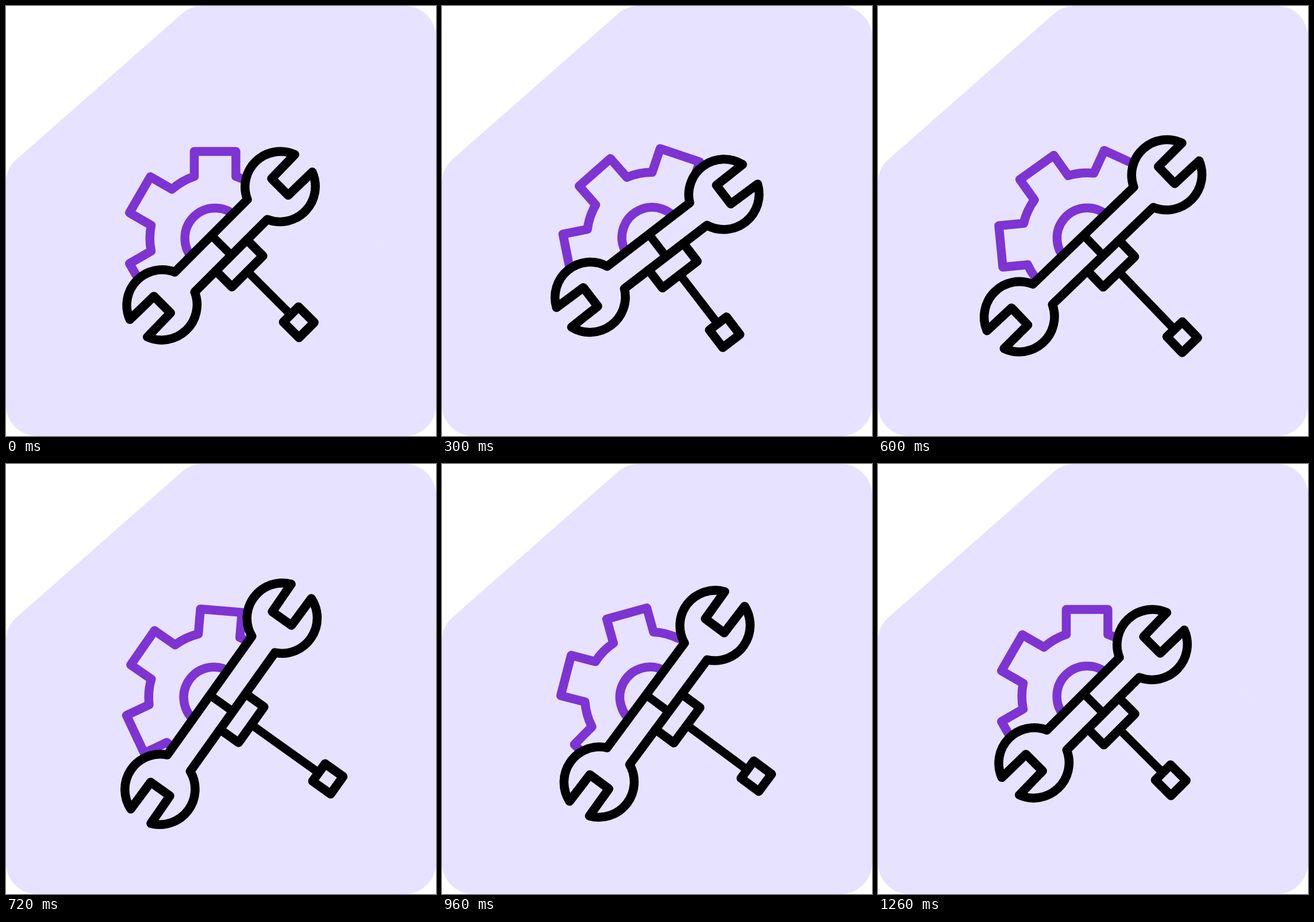
Animation of 748 by 748 pixels, one loop 1290 ms. Source, as an HTML page:

```html
<!DOCTYPE html>
<html lang="en">
<head>
<meta charset="utf-8">
<title>Tools</title>
<style>
  html, body { margin: 0; width: 100%; height: 100%; overflow: hidden; background: #fff; }
  svg { display: block; width: 100vw; height: 100vh; }
  .line { fill: none; stroke: #000; stroke-width: 15.5; stroke-linejoin: round; stroke-linecap: round; }
  .gear { stroke: #7d34d2; }
  .panel { fill: #e7e2ff; }
</style>
</head>
<body>
<svg viewBox="0 0 748 748">
  <path class="panel" d="M341 0H694A54 54 0 0 1 748 54V694A54 54 0 0 1 694 748H54A54 54 0 0 1 0 694V307A54 54 0 0 1 18 267L306 13.4A54 54 0 0 1 341 0Z"/>
  <g id="tools">
    <g id="gear" class="line gear">
      <path id="teeth"/>
      <circle r="52.5"/>
    </g>
    <!-- hides the gear behind and below the wrench -->
    <g class="panel">
      <rect x="-200" y="0" width="400" height="200"/>
      <circle id="coverA" r="61"/>
      <circle id="coverB" r="61"/>
    </g>
    <path id="wrench" class="line" style="fill:#e7e2ff"/>
    <path class="line" d="M-37.3 24.5V64H39V24.5"/>
    <path class="line" style="stroke-width:14.5" d="M1 -24V24"/>
    <path id="shaft" class="line" style="stroke-width:14.5"/>
    <rect id="tip" class="line" x="-17.2" width="37.4" height="38.5"/>
  </g>
</svg>
<script>
const LOOP = 1290;
const $ = id => document.getElementById(id);

// Symmetric ease-in-out of power n between steps a and b
function tween(i, a, b, n = 3) {
  const p = Math.min(1, Math.max(0, (i - a) / (b - a)));
  return p < 0.5 ? 2 ** (n - 1) * p ** n : 1 - 2 ** (n - 1) * (1 - p) ** n;
}

// Five poses per 180 ms, the first held twice as long
function stepAt(ms) {
  const t = ms % LOOP;
  return 5 * Math.floor(t / 180) + Math.max(0, Math.floor((t % 180) / 30) - 1);
}

function teethPath() {
  const half = 36.2, top = -151, base = -107.5, r = Math.hypot(half, base);
  const pts = [[-half, base], [-half, top], [half, top], [half, base]];
  let d = '';
  for (let k = 0; k < 6; k++) {
    const c = Math.cos(k * Math.PI / 3), s = Math.sin(k * Math.PI / 3);
    pts.forEach(([x, y], j) => {
      const cmd = j ? 'L' : k ? `A${r} ${r} 0 0 1 ` : 'M';
      d += `${cmd}${x * c - y * s} ${x * s + y * c}`;
    });
  }
  return d + `A${r} ${r} 0 0 1 ${pts[0].join(' ')}Z`;
}

function wrenchPath(h) {
  const arc = 'A61.5 61.5 0 0 1 ';
  const head = s => {
    const p = (x, y) => `${s * x} ${s * y}`;
    return `${p(h - 56.4, -24.5)}${arc}${p(h + 57.2, -21.5)}L${p(h - 1, -20.5)}` +
      `L${p(h - 1, 20.5)}L${p(h + 57.2, 21.5)}${arc}${p(h - 56.4, 24.5)}`;
  };
  return `M${head(1)}L${head(-1)}Z`;
}

function draw(ms) {
  const i = stepAt(ms);
  const tilt = 8.2 * tween(i, 0, 11.2) - 18 * tween(i, 11.1, 21.7) + 9.8 * tween(i, 23.6, 32.9, 2);
  const reach = 37.5 * (tween(i, 4.6, 21.4) - tween(i, 20.4, 33.6, 2));
  const spin = 180 * tween(i, 1.5, 31.4, 2.5);
  const h = 145.7 + reach;

  $('tools').setAttribute('transform', `translate(374.1 417.1) rotate(${tilt - 45})`);
  $('gear').setAttribute('transform', `translate(2 -16.7) rotate(${45 + spin})`);
  $('wrench').setAttribute('d', wrenchPath(h));
  $('coverA').setAttribute('cx', h);
  $('coverB').setAttribute('cx', -h);
  $('shaft').setAttribute('d', `M1 64V${170 + reach}`);
  $('tip').setAttribute('y', 170.4 + reach);
}

$('teeth').setAttribute('d', teethPath());
const start = performance.now();
function tick() {
  draw(performance.now() - start);
  requestAnimationFrame(tick);
}
tick();
</script>
</body>
</html>
```
